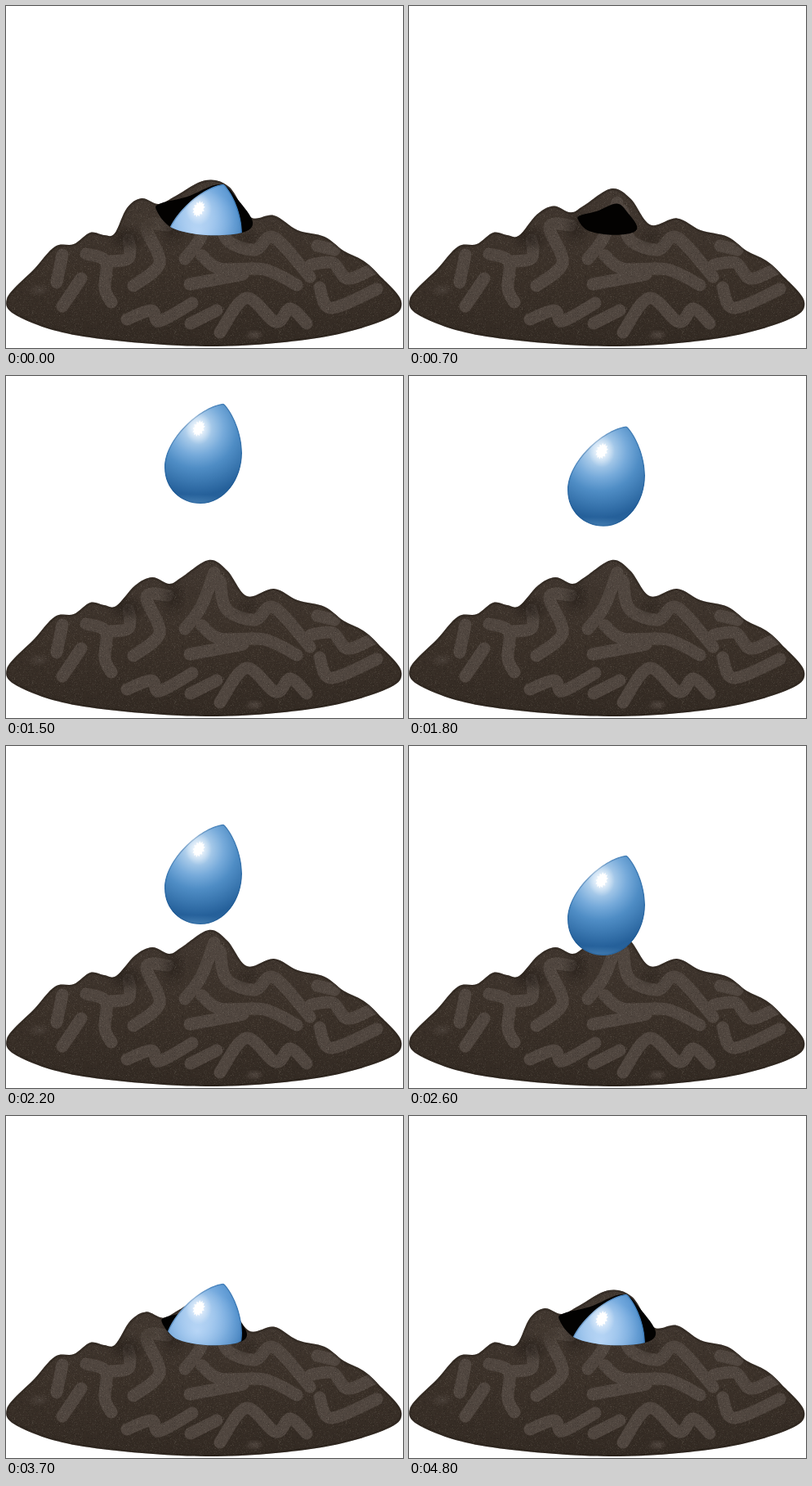
An HTML page with a canvas that plays this animation: 486 px wide and 418 px high, repeating every 4.9 s.

```html
<!DOCTYPE html>
<html lang="en">
<head>
<meta charset="utf-8">
<title>Drop and mound</title>
<style>
html, body { margin: 0; width: 100%; height: 100%; overflow: hidden; background: #fff; }
canvas { display: block; }
</style>
</head>
<body>
<canvas id="stage" width="486" height="418"></canvas>
<script>
const W = 486, H = 418, LOOP = 4900, STEP = 100;
const ctx = document.getElementById('stage').getContext('2d');

// Outline of the mound; the summit has a closed and an open shape
const LEFT = [1,358, 35,321, 60,294, 83,291, 103,277, 120,280];
const CLOSED = [135,281, 158,256, 179,246, 200,254, 215,246, 248,225, 271,238, 295,269, 328,260];
const OPEN = [133,278, 148,247, 166,235, 187,242, 208,232, 244,213, 273,221, 299,258, 328,256];
const RIGHT = [357,274, 390,282, 413,299, 437,311, 456,328, 484,361];
const BASE = [465,383, 380,406, 245,416, 95,404, 18,381];

// Mouth of the crater: back edge, then front lip
const BACK = [184,249, 190,241, 222,233, 262,218, 284,237];
const LIP = [302,264, 289,277, 245,280, 203,271];

const BANDS = [
  [69,304, 62,338],
  [92,333, 69,367],
  [98,303, 122,312, 121,345, 129,362],
  [125,312, 150,308, 150,286],
  [198,268, 172,270, 188,314, 156,342],
  [148,383, 178,372, 188,385, 228,363],
  [255,240, 239,282, 219,309],
  [262,250, 270,285, 304,298, 328,283, 372,331],
  [240,305, 262,321, 316,322, 356,341],
  [290,328, 225,340],
  [226,388, 258,372],
  [262,399, 294,357, 330,386, 348,370, 368,388],
  [381,293, 402,298],
  [374,316, 400,314, 418,333, 448,322],
  [384,344, 398,369, 454,346]
];

// [time, value] pairs
const TIP = [[100,218], [700,283], [800,9], [1000,9], [1100,10], [1300,20], [1500,34], [1900,71],
  [2200,96], [2600,134], [3000,154], [3200,154], [3700,205], [3800,205], [4100,209], [4400,209], [4800,218]];
const MOUTH = [[100,1], [800,0], [3200,0], [3700,.6], [3800,.6], [4100,.75], [4400,.75], [4800,1]];

function at(keys, t) {
  let a = keys[0];
  for (const b of keys) {
    if (t < b[0]) return b === a ? a[1] : a[1] + (b[1] - a[1]) * (t - a[0]) / (b[0] - a[0]);
    a = b;
  }
  return a[1];
}

const clamp = v => Math.min(1, Math.max(0, v));
const mix = (a, b, k) => a.map((v, i) => v + (b[i] - v) * k);

// Smooth curve through all points
function curve(p, closed) {
  const n = p.length / 2, path = new Path2D();
  const pt = i => {
    i = closed ? (i + n) % n : Math.min(n - 1, Math.max(0, i));
    return [p[2 * i], p[2 * i + 1]];
  };
  path.moveTo(...pt(0));
  for (let i = 0; i < (closed ? n : n - 1); i++) {
    const [a, b, c, d] = [i - 1, i, i + 1, i + 2].map(pt);
    path.bezierCurveTo(b[0] + (c[0] - a[0]) / 6, b[1] + (c[1] - a[1]) / 6,
      c[0] - (d[0] - b[0]) / 6, c[1] - (d[1] - b[1]) / 6, ...c);
  }
  if (closed) path.closePath();
  return path;
}

function shade(g, colors) {
  colors.forEach((c, i) => g.addColorStop(i / (colors.length - 1), c));
  return g;
}

function blob(x, y, rx, ry, rgb, alpha) {
  ctx.save();
  ctx.translate(x, y);
  ctx.scale(rx, ry);
  ctx.fillStyle = shade(ctx.createRadialGradient(0, 0, 0, 0, 0, 1), [`rgba(${rgb},${alpha})`, `rgba(${rgb},0)`]);
  ctx.fillRect(-1, -1, 2, 2);
  ctx.restore();
}

// Fine sandy grain, seeded
function makeGrain() {
  const c = document.createElement('canvas'), g = c.getContext('2d'), size = 128;
  let seed = 7;
  const rnd = () => (seed = seed * 16807 % 2147483647) / 2147483647;
  c.width = c.height = size;
  for (let i = 0; i < 5000; i++) {
    g.fillStyle = rnd() < .5 ? 'rgba(255,240,225,.05)' : 'rgba(0,0,0,.1)';
    g.fillRect(rnd() * size | 0, rnd() * size | 0, 1, 1);
  }
  return ctx.createPattern(c, 'repeat');
}
const grain = makeGrain();
const bands = BANDS.map(b => curve(b));
const earth = shade(ctx.createLinearGradient(0, 225, 0, 416), ['#413730', '#3b3129', '#332a23']);
const WALL = '66,56,48', DARK = '30,23,18';

function drawMound(open) {
  const shape = curve([...LEFT, ...mix(CLOSED, OPEN, open), ...RIGHT, ...BASE], true);
  ctx.save();
  ctx.clip(shape);
  ctx.fillStyle = earth;
  ctx.fillRect(0, 0, W, H);

  ctx.lineCap = ctx.lineJoin = 'round';
  ctx.lineWidth = 15;
  ctx.strokeStyle = '#50463f';
  bands.forEach(b => ctx.stroke(b));
  blob(304, 402, 12, 7, '80,70,63', 1);
  blob(40, 347, 14, 8, '80,70,63', .7);

  // the smooth wall pushed up around the crater
  blob(170, 262, 30, 30, WALL, open);
  blob(300, 270, 24, 18, WALL, .8 * open);
  blob(245, 224, 50, 16, WALL, open);
  blob(148, 284, 24, 18, DARK, .6);
  blob(205, 270, 18, 26, DARK, .5);
  blob(296, 282, 20, 14, DARK, .35);

  ctx.fillStyle = grain;
  ctx.fillRect(0, 0, W, H);
  ctx.lineWidth = 5;
  ctx.strokeStyle = `rgba(${DARK},.3)`;
  ctx.stroke(shape);
  ctx.restore();
}

const scaled = (p, s) => p.map((v, i) => { const o = i % 2 ? 279 : 243; return o + (v - o) * s; });
const spread = open => Math.pow(open, .25);

function drawMouth(open) {
  if (open <= 0) return;
  ctx.fillStyle = '#030201';
  ctx.fill(curve(scaled([...BACK, ...LIP], spread(open)), true));
}

const drop = new Path2D('M264 0C238 4 194 42 194 78C194 104 214 122 238 122C268 122 289 92 289 60' +
  'C289 36 278 12 268 1Q266-1 264 0Z');
const blue = shade(ctx.createRadialGradient(234, 30, 0, 234, 30, 98),
  ['#e8f3fd', '#a9cbea', '#76aada', '#4f8dc5', '#3a77b0', '#25609a', '#2a649b']);

function drawDrop(y, alpha, glow, open) {
  if (alpha <= 0) return;
  ctx.save();
  // the front lip hides whatever is below it
  const lip = scaled([...LIP, BACK[0], BACK[1]], Math.max(.88, spread(open)));
  const front = curve(lip);
  front.lineTo(150, lip[lip.length - 1]);
  front.lineTo(150, 0);
  front.lineTo(340, 0);
  front.lineTo(340, lip[1]);
  front.closePath();
  ctx.clip(front);
  ctx.translate(0, y);
  ctx.clip(drop);
  ctx.globalAlpha = alpha;
  ctx.fillStyle = blue;
  ctx.fill(drop);
  blob(228, 124, 50, 14, '120,175,220', .4);
  if (glow > 0) {
    blob(234, 58, 58, 52, '222,238,255', .85 * glow);
    ctx.fillStyle = `rgba(90,155,225,${.22 * glow})`;
    ctx.fill(drop);
  }
  ctx.lineWidth = 3;
  ctx.strokeStyle = 'rgba(25,85,145,.35)';
  ctx.stroke(drop);

  // ragged highlight
  blob(236, 30, 16, 20, '255,255,255', .7);
  ctx.fillStyle = '#fff';
  ctx.beginPath();
  for (let i = 0; i < 26; i++) {
    const a = i * Math.PI / 13, r = i % 2 ? 1 : .72;
    ctx.lineTo(236 + Math.cos(a) * 7.5 * r - Math.sin(a) * 2, 30 + Math.sin(a) * 10 * r);
  }
  ctx.fill();
  ctx.restore();
}

function frame(now) {
  const t = Math.floor(now % LOOP / STEP) * STEP;
  const open = at(MOUTH, t), sinking = t <= 700;
  ctx.fillStyle = '#fff';
  ctx.fillRect(0, 0, W, H);
  drawMound(open);
  drawMouth(open);
  const alpha = sinking ? 1 : clamp((t - 700) / 400);
  const glow = sinking ? 1 : clamp((t - 3200) / 400);
  drawDrop(at(TIP, t), alpha, glow, open);
}

const start = performance.now();
function tick() {
  frame(performance.now() - start);
  requestAnimationFrame(tick);
}
tick();
</script>
</body>
</html>
```
